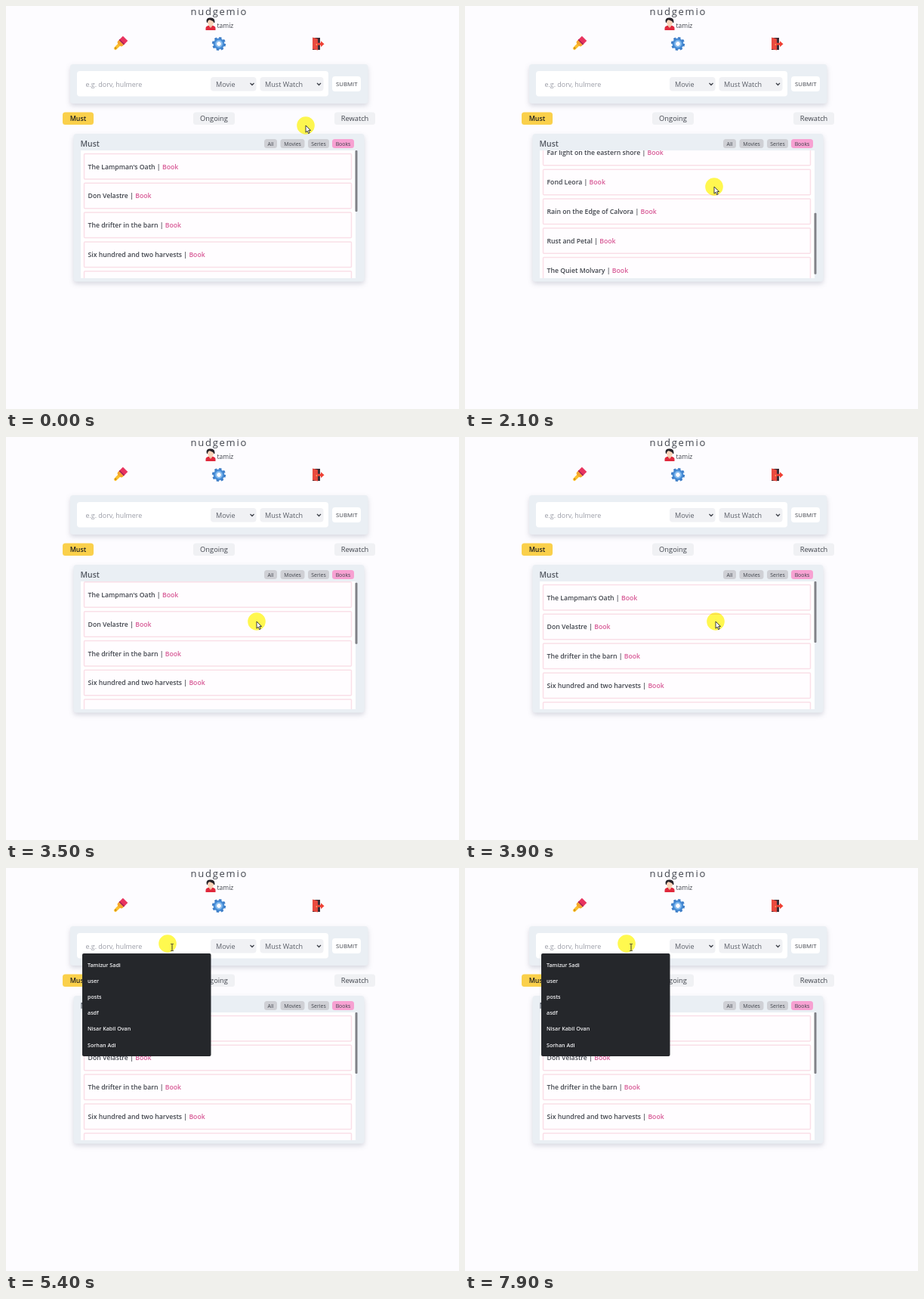
Recreate the animation shown at these times as an HTML page. Size 600 px wide and 533 px high, loop 8 s.

```html
<!DOCTYPE html>
<html lang="en">
<head>
<meta charset="utf-8">
<title>Watch list</title>
<style>
  html, body { margin: 0; width: 100%; height: 100%; overflow: hidden; background: #fdfcff; }
  svg { display: block; width: 600px; height: 533px; font-family: "Open Sans", "Noto Sans", sans-serif; fill: #40444c; }
  .semi { font-weight: 600; }
  .mid { text-anchor: middle; }
  .shadow { filter: drop-shadow(0 3px 3px #1f294a2b); }
  .panel { fill: #eaeff4; }
  .soft { fill: #f0f1f4; }
  .white { fill: #fff; }
  #spot { mix-blend-mode: multiply; }
</style>
</head>
<body>
<svg viewBox="0 0 600 533">
  <defs>
    <clipPath id="view"><rect x="99" y="191" width="364" height="169"/></clipPath>
  </defs>

  <text x="244.500" y="12" font-size="13" letter-spacing="1.75">nudgemio</text>
  <text x="279.500" y="28.500" font-size="8.500">tamiz</text>

  <g id="avatar">
    <path d="M264.500 32v-2.500q0-3 3.500-3.500h6q3.500.500 3.500 3.500v2.500z" fill="#e0283c"/>
    <path d="M269 24h4v3l-2 2-2-2z" fill="#eeb99c"/>
    <path d="M266 22q-2-6 4-6.500 7-1 6.500 6.500z" fill="#262329"/>
    <ellipse cx="271" cy="22" rx="4" ry="4.500" fill="#fbd3b8"/>
    <path d="M266.500 21q1-3.500 4-2.500 3 1 5 2.500v-3l-4-2-4 1z" fill="#262329"/>
  </g>

  <g id="brush" transform="translate(151 50) rotate(45)">
    <rect x="-2" y="0" width="4" height="10.500" rx="1.800" fill="#fbc02d"/>
    <circle cy="8" r=".8" fill="#a86a10"/>
    <path d="M-4.500-2.500h9v2q0 2-2.500 2.500h-4q-2.500-.500-2.500-2.500z" fill="#f6a62b"/>
    <path d="M-4.500-10h9v7.500h-9z" fill="#e8335f"/>
    <path d="M-4.500-4h9v1.500h-9z" fill="#a32650"/>
  </g>

  <g id="gear" transform="translate(282 50)">
    <circle r="5.200" fill="none" stroke="#4a8fd8" stroke-width="4.600"/>
    <circle r="7.800" fill="none" stroke="#3c7cc6" stroke-width="2.600" stroke-dasharray="3.200 2.926"/>
    <circle r="4" fill="none" stroke="#8fc3f2" stroke-width="1.500"/>
  </g>

  <g id="door">
    <path d="M406 42h10v16h-10z" fill="#3a2c36"/>
    <path d="M406 41.500l7 2v15l-7-1.500z" fill="#e9493f"/>
    <circle cx="411.300" cy="51" r=".8" fill="#ffd45a"/>
    <path d="M413 48.800h4v-2.500l4.500 4-4.500 4v-2.500h-4z" fill="#ee4034"/>
  </g>

  <g id="form">
    <rect class="panel shadow" x="85" y="77" width="394.500" height="52" rx="4"/>
    <rect class="white" x="94" y="86" width="333" height="33.500" rx="4"/>
    <text x="105.500" y="106.500" font-size="8.900" fill="#9a9ca6">e.g. dorv, hulmere</text>
    <rect class="soft" x="271" y="94" width="60.500" height="18.500" rx="4"/>
    <rect class="soft" x="336.500" y="94" width="84" height="18.500" rx="4"/>
    <g font-size="9.100" fill="#5b5f68">
      <text x="278" y="106.800">Movie</text>
      <text x="343" y="106.800">Must Watch</text>
    </g>
    <path d="M323.500 102l2.500 2.500 2.500-2.500m83.500 0l2.500 2.500 2.500-2.500" fill="none" stroke="#40444c" stroke-width="1.300"/>
    <rect class="white" x="432" y="93" width="38" height="20" rx="4"/>
    <text class="mid" x="451.300" y="106" font-size="7.800">SUBMIT</text>
  </g>

  <g id="tabs" class="mid" font-size="9.300">
    <rect x="75" y="140.500" width="41" height="16.500" rx="3.500" fill="#fad04b"/>
    <text class="semi" x="95.500" y="152.300" font-size="8.900" fill="#222">Must</text>
    <rect class="soft" x="248" y="140.500" width="55" height="16.500" rx="3.500"/>
    <text x="275.500" y="152.300">Ongoing</text>
    <rect class="soft" x="435" y="140.500" width="54" height="16.500" rx="3.500"/>
    <text x="462" y="152.300">Rewatch</text>
  </g>

  <rect id="card" class="panel shadow" x="89.500" y="169" width="385" height="195.500" rx="4"/>
  <text class="semi" x="98.500" y="186" font-size="10.400" fill="#555a63">Must</text>
  <g id="chips" class="mid" font-size="6.900"></g>
  <g id="list">
    <rect class="white" x="99" y="191" width="364" height="169"/>
    <g clip-path="url(#view)"><g id="items" class="semi" font-size="8.700"></g></g>
    <rect id="thumb" x="462.500" y="191" width="3" height="81" rx="1" fill="#808187"/>
  </g>

  <g id="menu" class="semi" font-size="7.150">
    <rect x="101" y="113" width="170.500" height="136" rx="2" fill="#25272b"/>
  </g>

  <circle id="spot" r="11.800" fill="#fff94f"/>
  <g id="cursor" stroke="#26262a" stroke-width=".9" fill="#fff" stroke-linejoin="round">
    <path id="arrow" d="M0 0v9.200l2.100-2 1.500 3.400 1.600-.7-1.500-3.300h2.900z"/>
    <path id="hand" transform="translate(3 0)" d="M0 1q1-1.500 2 0v4l4.500 1q1 .3.800 1.700l-.8 3.300v1.500h-5v-1.500l-3-3.500q-.5-1.500 1.500-.7z"/>
    <path id="beam" transform="translate(6 5)" d="M-1.800-4.500h1.300l.5.500.5-.5h1.300M0-4v8M-1.800 4.500h1.300l.5-.5.5.5h1.300" fill="none"/>
  </g>
</svg>
<script>
  const LOOP = 8000, ROW = 38.8, MAX_SCROLL = 184;
  const SERIES_CLICK = 600, BOOKS_CLICK = 1500, MENU_OPEN = 4900;

  const books = ["The Lampman's Oath", "Don Velastre", "The drifter in the barn",
    "Six hundred and two harvests", "Far light on the eastern shore", "Fond Leora",
    "Rain on the Edge of Calvora", "Rust and Petal", "The Quiet Molvary"];
  const chips = [["All", 342, 17], ["Movies", 363.5, 32], ["Series", 400, 28], ["Books", 432, 29]];
  const suggestions = ["Tamizur Sadi", "user", "posts", "asdf", "Nisar Kabil Ovan", "Sorhan Adi"];

  // Pointer stops: time, x, y
  const stops = [[0, 397, 158], [100, 397, 158], [500, 412, 184], [900, 412, 184],
    [1200, 440, 184], [1500, 440, 184], [1850, 330, 239], [2150, 330, 239],
    [2400, 332, 244], [4300, 332, 244], [4800, 214, 100], [LOOP, 214, 100]];

  // Areas with a hand pointer: x, y, width, height
  const buttons = [[248, 141, 55, 16], [271, 94, 60, 18], ...chips.map(([, x, w]) => [x, 176, w, 12])];

  const $ = id => document.getElementById(id);
  const show = (id, on) => $(id).style.display = on ? "" : "none";
  const clamp = v => Math.min(1, Math.max(0, v));
  const ease = (t, from, to) => (1 - Math.cos(Math.PI * clamp((t - from) / (to - from)))) / 2;
  const inside = (px, py, [x, y, w, h]) => px >= x && px <= x + w && py >= y && py <= y + h;

  $("items").innerHTML = books.map((title, i) => `<g transform="translate(0 ${i * ROW})">
    <rect x="103.500" y="195.500" width="354" height="33.500" rx="1" fill="#fffdff" stroke="#fadfe8" stroke-width="1.500"/>
    <text x="108.500" y="215.600">${title} | <tspan fill="#d85b97">Book</tspan></text></g>`).join("");
  $("chips").innerHTML = chips.map(([name, x, w]) =>
    `<rect x="${x}" y="176" width="${w}" height="12" rx="3.500"/>
     <text x="${x + w / 2}" y="184.500">${name}</text>`).join("");
  $("menu").innerHTML += suggestions.map((name, i) =>
    `<text x="108" y="${131 + i * 21.1}" fill="#f1f1f3">${name}</text>`).join("");
  const chipRects = $("chips").querySelectorAll("rect");

  function pointerAt(t) {
    const i = stops.findIndex(s => s[0] > t);
    const [t0, x0, y0] = stops[i - 1], [t1, x1, y1] = stops[i];
    const p = ease(t, t0, t1);
    return [x0 + (x1 - x0) * p, y0 + (y1 - y0) * p];
  }

  function draw(t) {
    const empty = t >= SERIES_CLICK && t < BOOKS_CLICK;
    show("list", !empty);
    $("card").setAttribute("height", empty ? 26.5 : 195.5);
    chipRects.forEach((r, i) => r.setAttribute("fill", i === (empty ? 2 : 3) ? "#f7a1d2" : "#cfd0d5"));

    const scroll = MAX_SCROLL * (ease(t, 1560, 2200) - ease(t, 2500, 3600));
    $("items").setAttribute("transform", `translate(0 ${-scroll})`);
    $("thumb").setAttribute("y", 191 + scroll * 0.478);
    show("menu", t >= MENU_OPEN);

    const [x, y] = pointerAt(t);
    const place = `translate(${x} ${y})`;
    $("spot").setAttribute("transform", place);
    $("cursor").setAttribute("transform", place);
    const beam = inside(x, y, [94, 86, 177, 33]);
    const hand = !beam && buttons.some(b => inside(x, y, b));
    show("beam", beam);
    show("hand", hand);
    show("arrow", !beam && !hand);
  }

  const start = performance.now();
  function tick() {
    draw((performance.now() - start) % LOOP);
    requestAnimationFrame(tick);
  }
  tick();
</script>
</body>
</html>
```
